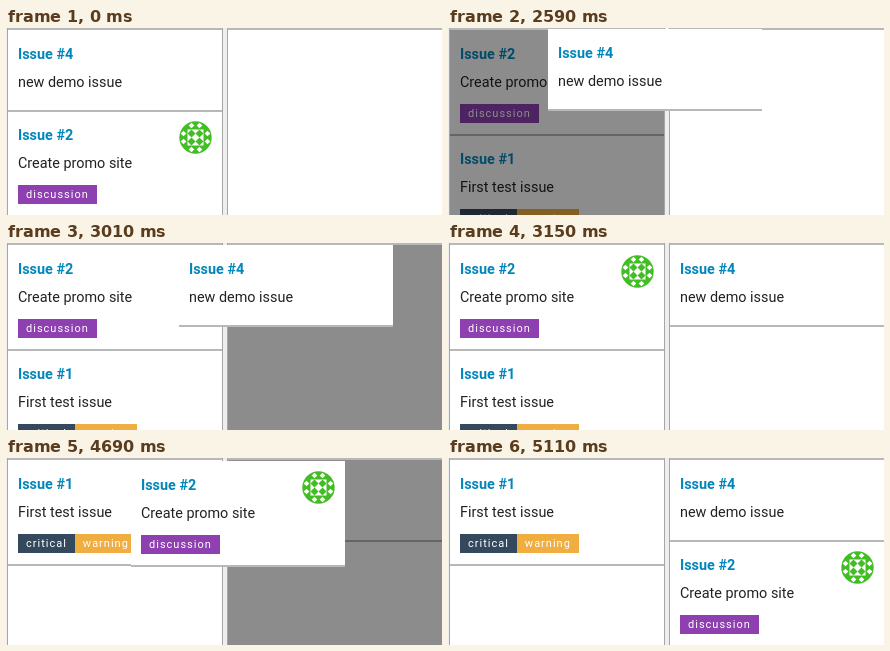
An HTML page that plays this animation: 436x187 px, repeating every 6.51 s.

```html
<!DOCTYPE html>
<html lang="en">
<head>
<meta charset="utf-8">
<title>Issue board</title>
<style>
  html, body { margin: 0; width: 100%; height: 100%; overflow: hidden; }
  body { position: relative; background: #eee; color: rgba(0, 0, 0, .87); font: 14.4px/20px Roboto, sans-serif; }
  body * { position: absolute; box-sizing: border-box; white-space: nowrap; }
  .column { top: 0; width: 216px; height: 187px; background: #fff; border: solid #a6a6a6; border-width: 0 1px;
    box-shadow: inset 0 2px #b8b8b8; }
  .card { width: 214px; background: #fff; }
  .card::after { content: ""; position: absolute; top: calc(100% - 1px); width: 100%; height: 2px; background: #b8b8b8; z-index: 1; }
  .card b { left: 10px; top: 15px; color: #0086bb; }
  .card p { left: 10px; top: 43px; margin: 0; }
  .labels { left: 10px; top: 74px; display: flex; }
  .labels span { position: static; padding: 0 8px; color: #fff; font-size: 11px; line-height: 19px; letter-spacing: 1px; }
  .card svg { left: 171px; top: 10px; }
  #dim { top: 2px; width: 214px; height: 185px; background: rgba(0, 0, 0, .45); z-index: 2; }
</style>
</head>
<body>
<div class="column" style="left:1px"></div>
<div class="column" style="left:221px"></div>
<div class="card" id="demo" style="height:81px"><b>Issue #4</b><p>new demo issue</p></div>
<div class="card" id="promo" style="height:105px">
  <b>Issue #2</b><p>Create promo site</p>
  <div class="labels"><span style="background:#8e3fb0">discussion</span></div>
  <svg width="33" height="33" viewBox="-16.5 -16.5 33 33">
    <circle r="16.2" fill="#43bd24"/>
    <path fill="#fff" d="M-8-8H8V8H-8Z"/>
    <g id="dots"></g>
  </svg>
</div>
<div class="card" id="test" style="height:105px">
  <b>Issue #1</b><p>First test issue</p>
  <div class="labels"><span style="background:#34495e">critical</span><span style="background:#f0ad42">warning</span></div>
</div>
<div id="dim"></div>
<script>
const LOOP = 6510, STEP = 70, LEFT = 2, RIGHT = 222, TOP = 2;
const [demo, promo, test, dim, dots] =
  ['demo', 'promo', 'test', 'dim', 'dots'].map(id => document.getElementById(id));

// overAt: the step at which the pointer enters the right column
const drags = [
  { card: demo, start: 2520, end: 3150, overAt: 2,
    x: [76, 100, 125, 148, 160, 168, 172, 173], y: [0, -1, -3, -4, -3, -2, -1, 0] },
  { card: promo, start: 4550, end: 5110, overAt: 2,
    x: [42, 83, 125, 165, 195, 214], y: [0, 0, 1, 1, 1, 1] },
];

const diamond = (x, y, r, fill) =>
  `<path fill="${fill}" d="M${x - r} ${y}l${r} ${-r} ${r} ${r} ${-r} ${r}z"/>`;
let marks = '';
for (const a of [-1, 1]) for (const b of [-1, 1]) {
  marks += diamond(a * 4, b * 4, 4, '#43bd24')
    + diamond(a * 4, b * 12, 2.8, '#fff') + diamond(a * 12, b * 4, 2.8, '#fff');
}
dots.innerHTML = marks;

function place(card, x, y, z = 'auto') {
  Object.assign(card.style, { left: x + 'px', top: y + 'px', zIndex: z });
}

function stack(cards, x) {
  let y = TOP;
  for (const card of cards) {
    place(card, x, y);
    y += card.offsetHeight;
  }
}

function draw(t) {
  const held = drags.find(d => t >= d.start && t < d.end);
  const moved = drags.filter(d => t >= d.end).map(d => d.card);
  stack([demo, promo, test].filter(c => !moved.includes(c) && c !== held?.card), LEFT);
  stack(moved, RIGHT);
  dim.hidden = !held;
  if (!held) return;
  const i = Math.min(Math.floor((t - held.start) / STEP), held.x.length - 1);
  place(held.card, held.x[i], TOP + held.y[i], 3);
  dim.style.left = (i < held.overAt ? LEFT : RIGHT) + 'px';
}

const begin = performance.now();
function frame() {
  draw((performance.now() - begin) % LOOP);
  requestAnimationFrame(frame);
}
frame();
</script>
</body>
</html>
```
